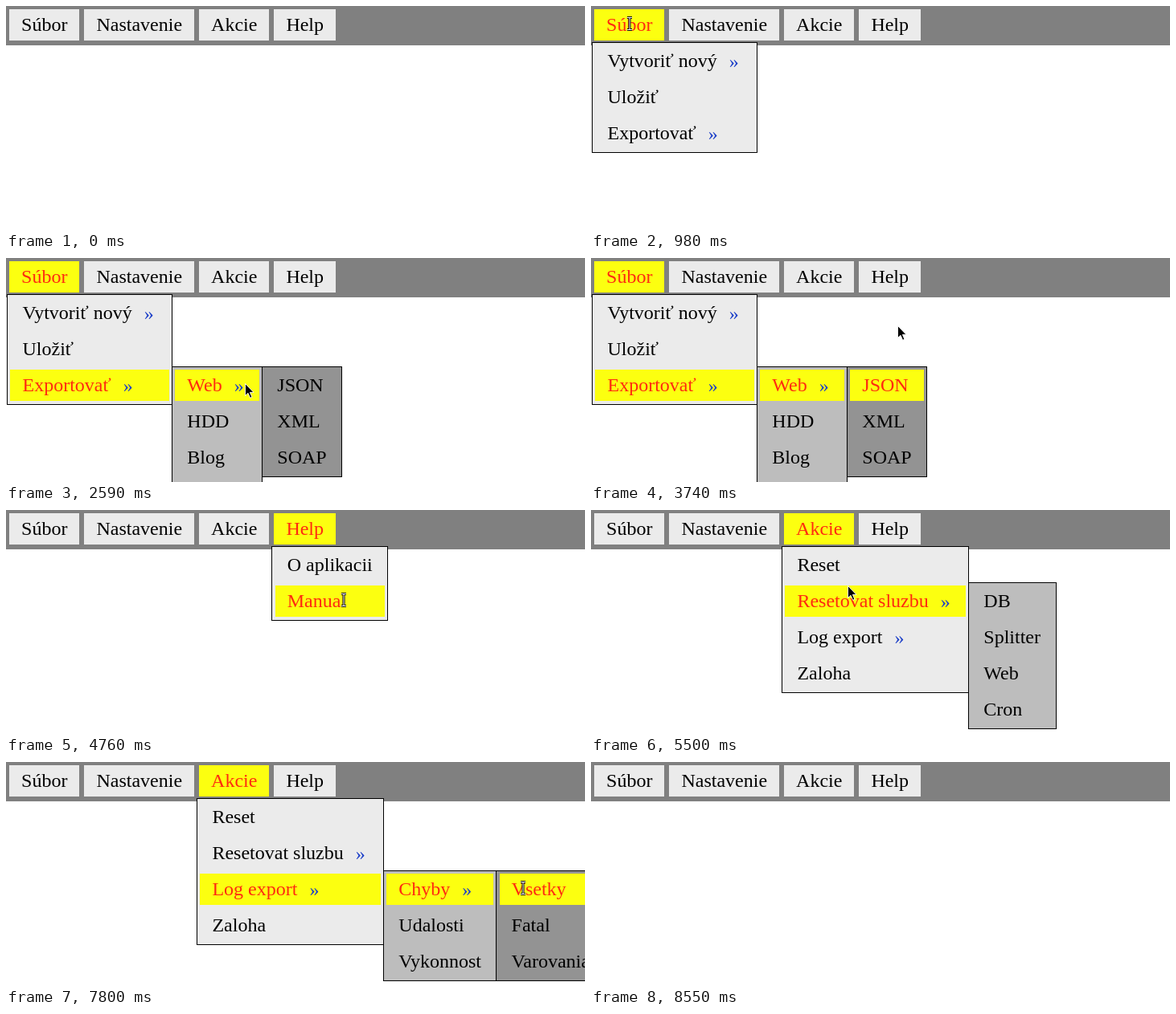
Recreate the animation shown at these times as an HTML page. Size 720x279 px, loop 9.23 s.

```html
<!DOCTYPE html>
<html lang="sk">
<head>
<meta charset="utf-8">
<title>Menu</title>
<style>
html, body { margin: 0; width: 100%; height: 100%; overflow: hidden; background: #fff; }
body { position: relative; font: 24px/27px "Liberation Serif", "Times New Roman", serif; color: #000; }
#bar, .panel { position: absolute; box-sizing: border-box; display: flex; gap: 6px; }
#bar { left: 0; top: 0; width: 100%; height: 49px; padding: 4px 0 6px 4.1px; background: #808080; }
.panel { flex-direction: column; padding: 3px 3.6px 4px; border: 1px solid #000; visibility: hidden; }
.panel.open { visibility: visible; }
.item { padding: 6px 15px; white-space: nowrap; }
#bar .item, .d1 { background: #ebebeb; }
.d2 { background: #bdbdbd; }
.d3 { background: #939393; }
.more { position: relative; top: 1px; margin: 0 4px 0 15px; color: #1c3fc8; }
#bar .item.on, .panel .item.on { background: #fcff10; color: #ff2a10; }
svg { position: absolute; left: 0; top: 0; overflow: visible; display: none; }
#arrow { left: -1px; top: -1px; }
</style>
</head>
<body>
<div id="bar"></div>
<svg id="arrow" width="12" height="19">
  <path d="M.5 .5V15.5L4 12.3L6.6 18.3L8.9 17.3L6.4 11.4H11Z" fill="#000" stroke="#fff" stroke-width=".9"/>
</svg>
<svg id="beam" width="7" height="17" fill="none">
  <path d="M-3 -7.5H3M-3 7.5H3M0 -7.5V7.5" stroke="#000" stroke-width="3"/>
  <path d="M-3 -7.5H3M-3 7.5H3M0 -7.5V7.5" stroke="#fff"/>
</svg>
<script>
const LOOP = 9230, STEP = 70;
const $ = id => document.getElementById(id);
const nodes = [], panels = [];

const tabs = [
  ['Súbor', [
    ['Vytvoriť nový', ['Report', 'Modul', 'Klient', 'Profil']],
    'Uložiť',
    ['Exportovať', [['Web', ['JSON', 'XML', 'SOAP']], 'HDD', 'Blog', 'Cron']]]],
  'Nastavenie',
  ['Akcie', [
    'Reset',
    ['Resetovat sluzbu', ['DB', 'Splitter', 'Web', 'Cron']],
    ['Log export', [['Chyby', ['Vsetky', 'Fatal', 'Varovania']], 'Udalosti', 'Vykonnost']],
    'Zaloha']],
  ['Help', ['O aplikacii', 'Manual']]
];

function add(parent, tag, cls, text = '') {
  const el = document.createElement(tag);
  el.className = cls;
  el.textContent = text;
  return parent.appendChild(el);
}

// Fill a bar or panel, then hang each submenu on its laid-out item
function fill(box, entries, depth, parent) {
  const made = entries.map(entry => {
    const [label, sub] = [].concat(entry);
    const el = add(box, 'div', 'item');
    const text = add(el, 'span', '', label);
    if (sub && parent) add(el, 'span', 'more', '»');
    return { el, text, label, sub, parent };
  });
  nodes.push(...made);
  for (const node of made) {
    node.rect = node.el.getBoundingClientRect();
    node.textRect = node.text.getBoundingClientRect();
    if (node.sub) addPanel(node, box, depth + 1);
  }
}

function addPanel(owner, from, depth) {
  const box = add(document.body, 'div', 'panel d' + depth);
  const { left, top, bottom } = owner.rect;
  const x = depth > 1 ? from.getBoundingClientRect().right - 1.6 : left - 3.2;
  const y = depth > 1 ? top - 4 : bottom + 2;
  box.style.left = x + 'px';
  box.style.top = y + 'px';
  panels.push({ box, owner });
  fill(box, owner.sub, depth, owner);
}

fill($('bar'), tabs, 0, null);
document.body.append($('arrow'), $('beam'));

// A spot on an item, as shares of its width and height
function at(label, fx = 0.5, fy = 0.46) {
  const { left, top, width, height } = nodes.find(n => n.label === label).rect;
  return { x: left + width * fx, y: top + height * fy };
}

const entry = { x: 450, y: 300 }, exit = { x: 740, y: 300 };

// Pointer moves: start, end, spots visited
const moves = [
  [350, 980, at('Súbor')],
  [1180, 1320, at('Vytvoriť nový', 0.44)],
  [1850, 2050, at('Exportovať', 0.57)],
  [2250, 2590, at('Web', 0.84)],
  [2920, 3210, at('JSON', 0.4), at('XML', 0.42)],
  [3670, 3880, at('Help', 0.75, 0.82)],
  [4340, 4410, at('Help', 0.75, 0.95)],
  [4610, 4760, at('Manual', 0.63)],
  [4960, 5170, at('Akcie')],
  [5430, 6130, at('Resetovat sluzbu', 0.38, 0.36), at('DB', 0.35), at('Splitter', 0.35)],
  [6330, 6470, at('Log export', 0.67)],
  [6740, 6880, at('Chyby', 0.43)],
  [7030, 7940, at('Udalosti', 0.43, 0.9), at('Chyby'), at('Vsetky', 0.3)],
  [8010, 8220, at('Varovania', 0.3)],
  [8480, 8550, exit]
];

const within = (r, x, y, pad) =>
  x >= r.left && x < r.right && y >= r.top + pad && y < r.bottom - Math.max(pad, 0);

function chain(node) {
  return node ? [node, ...chain(node.parent)] : [];
}

function hit(x, y, active) {
  for (const owner of [...active, null]) {
    const found = nodes.find(n => n.parent === owner && within(n.rect, x, y, -1));
    if (found) return found;
  }
}

// Replay the pointer once; the menu stays open for one step off its items
function replay() {
  const states = [{ t: 0, ...entry, active: [] }];
  let last = entry, active = [], misses = 0;
  for (const [start, end, ...spots] of moves) {
    const pts = [last, ...spots];
    const gaps = Math.round((end - start) / STEP);
    for (let k = 0; k <= gaps; k++) {
      const u = Math.sin((k + 1) / (gaps + 1) * Math.PI / 2) * spots.length;
      const i = Math.min(Math.floor(u), spots.length - 1);
      const mix = axis => Math.round(pts[i][axis] + (pts[i + 1][axis] - pts[i][axis]) * (u - i));
      const x = mix('x'), y = mix('y');
      const over = hit(x, y, active);
      misses = over ? 0 : misses + 1;
      if (over) active = chain(over);
      else if (misses > 1) active = [];
      const beam = !!over && within(over.textRect, x, y, 2);
      states.push({ t: start + (end - start) * k / gaps, x, y, active, beam });
    }
    last = spots.at(-1);
  }
  return states;
}

const states = replay();
let shown;

function draw(t) {
  const s = states.findLast(state => state.t <= t + 0.01);
  if (s === shown) return;
  shown = s;
  nodes.forEach(n => n.el.classList.toggle('on', s.active.includes(n)));
  panels.forEach(p => p.box.classList.toggle('open', s.active.includes(p.owner)));
  for (const id of ['arrow', 'beam']) {
    $(id).style.display = (id === 'beam') === !!s.beam ? 'block' : 'none';
    $(id).style.transform = `translate(${s.x}px, ${s.y}px)`;
  }
}

const begin = performance.now();
function tick() {
  draw((performance.now() - begin) % LOOP);
  requestAnimationFrame(tick);
}
tick();
</script>
</body>
</html>
```
